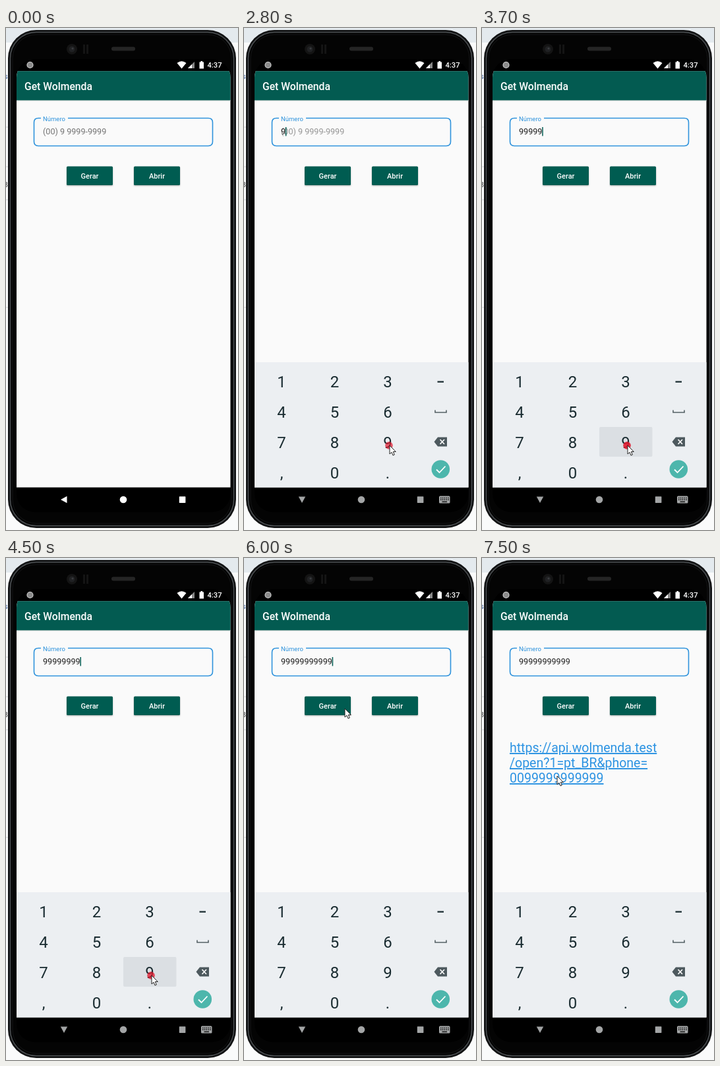
These frames come from a looping animation (352 by 760 pixels, 8 s). An HTML page:

```html
<!DOCTYPE html>
<html lang="pt-BR">
<head>
<meta charset="utf-8">
<title>Phone demo</title>
<style>
html, body { margin: 0; width: 100%; height: 100%; overflow: hidden; background: #fafbfb; }
svg { display: block; width: 352px; height: 760px; font-family: Roboto, sans-serif; }
.mid { text-anchor: middle; }
.bold { font-weight: 500; fill: #fff; }
#link { text-decoration: underline; text-decoration-thickness: 1.1px; text-underline-offset: 2.2px; }
</style>
</head>
<body>
<svg viewBox="0 0 352 760">
  <defs>
    <filter id="shade" x="-10%" y="-20%" width="120%" height="160%">
      <feDropShadow dx="0" dy="1" stdDeviation=".8" flood-color="#000" flood-opacity=".3"/>
    </filter>
    <clipPath id="screen"><rect x="16" y="47" width="324.500" height="686" rx="28"/></clipPath>
  </defs>

  <!-- desktop behind the phone -->
  <rect width="352" height="760" fill="#fafbfb"/>
  <rect width="352" height="22" fill="#e4eaee"/>
  <path d="M0 150H5M0 210H5M0 260H5M0 423H5" stroke="#d5d8da"/>
  <text x="-3" y="77" font-size="11" fill="#3c5f9c">s</text>
  <text x="-4" y="241" font-size="11" fill="#444">B</text>

  <!-- phone body -->
  <rect x="3" y="3" width="346" height="754" rx="43" fill="#121314"/>
  <rect x="6.500" y="6.500" width="339" height="747" rx="39.500" fill="#040404" stroke="#4c5053" stroke-width="1.500"/>
  <rect x="10" y="10" width="332" height="740" rx="36" fill="none" stroke="#141516"/>
  <circle cx="100" cy="32" r="8" fill="#141414"/>
  <circle cx="100" cy="32" r="4.500" fill="#202123"/>
  <circle cx="101" cy="31" r="1.600" fill="#3a3b3f"/>
  <path d="M117 25h3v14h-3zM122 25h3v14h-3z" fill="#141414"/>
  <rect x="160" y="28.500" width="36" height="6" rx="3" fill="#252525"/>

  <g clip-path="url(#screen)">
    <!-- status bar -->
    <rect x="16" y="47" width="325" height="686" fill="#000"/>
    <circle cx="36.500" cy="56" r="4.500" fill="#8b8b8b" stroke="#d0d0d0" stroke-width="1.200"/>
    <path d="M259.500 53Q266.500 47.500 273.500 53L266.500 61.500Z" fill="#fff"/>
    <path d="M286 51V61H276Z" fill="#888"/><path d="M282 55V61H276Z" fill="#fff"/>
    <path d="M293.500 51.500h2v-1.500h2.500v1.500h2v10h-6.500z" fill="#fff"/>
    <text x="305.500" y="60" font-size="11.200" class="bold">4:37</text>

    <!-- app -->
    <rect x="16" y="65.200" width="325" height="630.300" fill="#fafafa"/>
    <rect x="16" y="109" width="325" height="1.500" fill="#d3d8d7"/>
    <rect x="16" y="65.200" width="325" height="44.200" fill="#035b51"/>
    <text x="28" y="93.500" font-size="15.700" class="bold">Get Wolmenda</text>
  </g>
  <path d="M53 136.500H49Q42.500 136.500 42.500 143V172Q42.500 178.500 49 178.500H307Q313.500 178.500 313.500 172V143Q313.500 136.500 307 136.500H94" fill="none" stroke="#2f93dc" stroke-width="1.600"/>
  <text x="56" y="140.500" font-size="9.500" fill="#2f93dc">Número</text>
  <text id="hint" x="56" y="161" font-size="12.600" fill="#757575">(00) 9 9999-9999</text>
  <text id="typed" x="56" y="161" font-size="12.600" fill="#212121"></text>
  <rect id="caret" y="150" width="1.500" height="13.500" fill="#035b51"/>
  <g filter="url(#shade)">
    <rect id="gen" x="92" y="209.500" width="70" height="28.500" rx="1.500" fill="#035b51"/>
    <rect x="194" y="209.500" width="70" height="28.500" rx="1.500" fill="#035b51"/>
  </g>
  <text x="127" y="228" font-size="11" class="mid bold">Gerar</text>
  <text x="229" y="228" font-size="11" class="mid bold">Abrir</text>
  <g id="link" font-size="19.500" fill="#2c93e2">
    <text x="42" y="294">https://api.wolmenda.test</text>
    <text x="42" y="317">/open?1=pt_BR&amp;phone=</text>
    <text x="42" y="340">0099999999999</text>
  </g>

  <!-- keyboard -->
  <g id="board" clip-path="url(#screen)">
    <g id="pad">
      <rect x="16" y="506" width="325" height="189.500" fill="#eceff2"/>
      <rect id="press" x="178" y="604" width="80.500" height="45" rx="2" fill="#dbdfe3"/>
      <g id="keys" font-size="24" fill="#1a2c31" class="mid"></g>
      <path d="M293.500 535.700H303" stroke="#1a2c31" stroke-width="2.200"/>
      <path d="M290 578.500V582H307V578.500" fill="none" stroke="#566166" stroke-width="1.600"/>
      <path d="M288.500 626.500L294 619.500H308V633.500H294Z" fill="#4d595e"/>
      <path d="M297.500 623L304 630M304 623L297.500 630" stroke="#fff" stroke-width="1.600"/>
      <circle cx="298.300" cy="668" r="13.800" fill="#4db6ac"/>
      <path d="M292 668.500L296.500 673L305.500 663.500" fill="none" stroke="#fff" stroke-width="1.800"/>
    </g>
    <rect id="strip" x="16" y="695" width="325" height="7.500" fill="#c6c9ca"/>
  </g>

  <!-- navigation bar -->
  <g id="nav">
    <path id="back" d="M83 714L92.500 708.800V719.200Z"/>
    <circle cx="178" cy="714" r="5.300"/>
    <rect x="262.800" y="709.300" width="9.600" height="9.600" rx=".6"/>
    <g id="kbd">
      <rect x="296" y="708.500" width="16.500" height="11" rx="1.500"/>
      <path d="M298 711.500H311M298 714.200H311" stroke="#000" stroke-width="1.400" stroke-dasharray="1.500 1.300"/>
      <path d="M300.500 717.300H308" stroke="#000" stroke-width="1.300"/>
    </g>
  </g>

  <circle id="dot" r="5.800" fill="#e0182d"/>
  <path id="mouse" d="M0 0V13L3 10.300L5 15L7.300 14L5.300 9.500H9.300Z" fill="#fff" stroke="#222" stroke-width="1" stroke-linejoin="round"/>
</svg>
<script>
const $ = id => document.getElementById(id);
const show = (id, on) => $(id).setAttribute('visibility', on ? 'visible' : 'hidden');
const set = (id, name, value) => $(id).setAttribute(name, value);

const LOOP = 8000, STEP = 100;
const FOCUS = 1100, FIRST = 2740, GAP = 226, COUNT = 11;
const LAST = FIRST + GAP * (COUNT - 1);
const CLICK = 6200;

// pointer stops: time, x, y
const PATH = [
  [100, -8, 330], [500, 44, 246], [900, 86, 166], [1100, 88, 163],
  [1600, 88, 163], [1900, 168, 440], [2100, 221, 632], [5300, 221, 632],
  [5500, 214, 425], [5700, 227, 302], [5900, 155, 231], [6000, 153, 228],
  [6300, 153, 228], [6700, 118, 370], [6900, 116, 379], [7100, 116, 379],
  [7500, 114, 330]
];

['123', '456', '789', ',0.'].forEach((row, r) => [...row].forEach((key, c) => {
  const el = document.createElementNS('http://www.w3.org/2000/svg', 'text');
  el.setAttribute('x', 57 + 80.5 * c);
  el.setAttribute('y', 544 + 46 * r);
  el.textContent = key;
  $('keys').append(el);
}));

function pointer(t) {
  const i = PATH.findIndex(p => p[0] > t);
  if (i < 0) return PATH[PATH.length - 1].slice(1);
  if (i === 0) return PATH[0].slice(1);
  const [a, ax, ay] = PATH[i - 1], [b, bx, by] = PATH[i];
  const k = (t - a) / (b - a), e = k * k * (3 - 2 * k);
  return [ax + (bx - ax) * e, ay + (by - ay) * e];
}

function draw(time) {
  const t = Math.min(7500, Math.floor(time / STEP) * STEP);
  const count = Math.max(0, Math.min(COUNT, Math.floor((t - FIRST) / GAP) + 1));

  // text field
  $('typed').textContent = '9'.repeat(count);
  show('hint', t < 2900);
  set('hint', 'opacity', count ? 0.75 : 1);
  const since = count ? FIRST + (count - 1) * GAP : t >= FOCUS ? FOCUS : 200;
  show('caret', t >= since && Math.floor((t - since) / 500) % 2 === 0);
  set('caret', 'x', 55.8 + count * 7.08);

  // keyboard
  const open = t >= 1500, shift = t < 1600 ? 7 : 0;
  show('board', open);
  show('strip', open && shift > 0);
  set('pad', 'transform', `translate(0 ${shift})`);
  set('pad', 'opacity', shift ? 0.92 : 1);
  const near = Math.max(0, Math.min(COUNT - 1, Math.round((t - FIRST) / GAP)));
  const phase = t - FIRST - near * GAP;
  show('press', open && phase >= -90 && phase <= (near ? 75 : 30));

  // navigation bar
  const turned = t >= 1200;
  set('nav', 'fill', turned ? '#a3a5a6' : '#fff');
  set('back', 'transform', turned ? 'rotate(-90 88 714)' : '');
  show('kbd', turned);

  // pointer and click mark
  const [x, y] = pointer(t);
  set('mouse', 'transform', `translate(${x} ${y})`);
  show('mouse', t >= 100);
  let glow = 0;
  if (t >= FIRST - 100 && t <= LAST + 150) glow = near ? 0.95 - Math.abs(phase - 30) / 400 : 0.7;
  for (const c of [FOCUS, CLICK]) if (t >= c && t < c + 300) glow = 0.9 - (t - c) / 400;
  set('dot', 'cx', x - 1);
  set('dot', 'cy', y);
  set('dot', 'opacity', glow);

  // result
  set('gen', 'fill', t >= CLICK && t < CLICK + 200 ? '#2c7569' : '#035b51');
  show('link', t >= CLICK + 100);
}

const start = performance.now();
function tick() {
  draw((performance.now() - start) % LOOP);
  requestAnimationFrame(tick);
}
tick();
</script>
</body>
</html>
```
